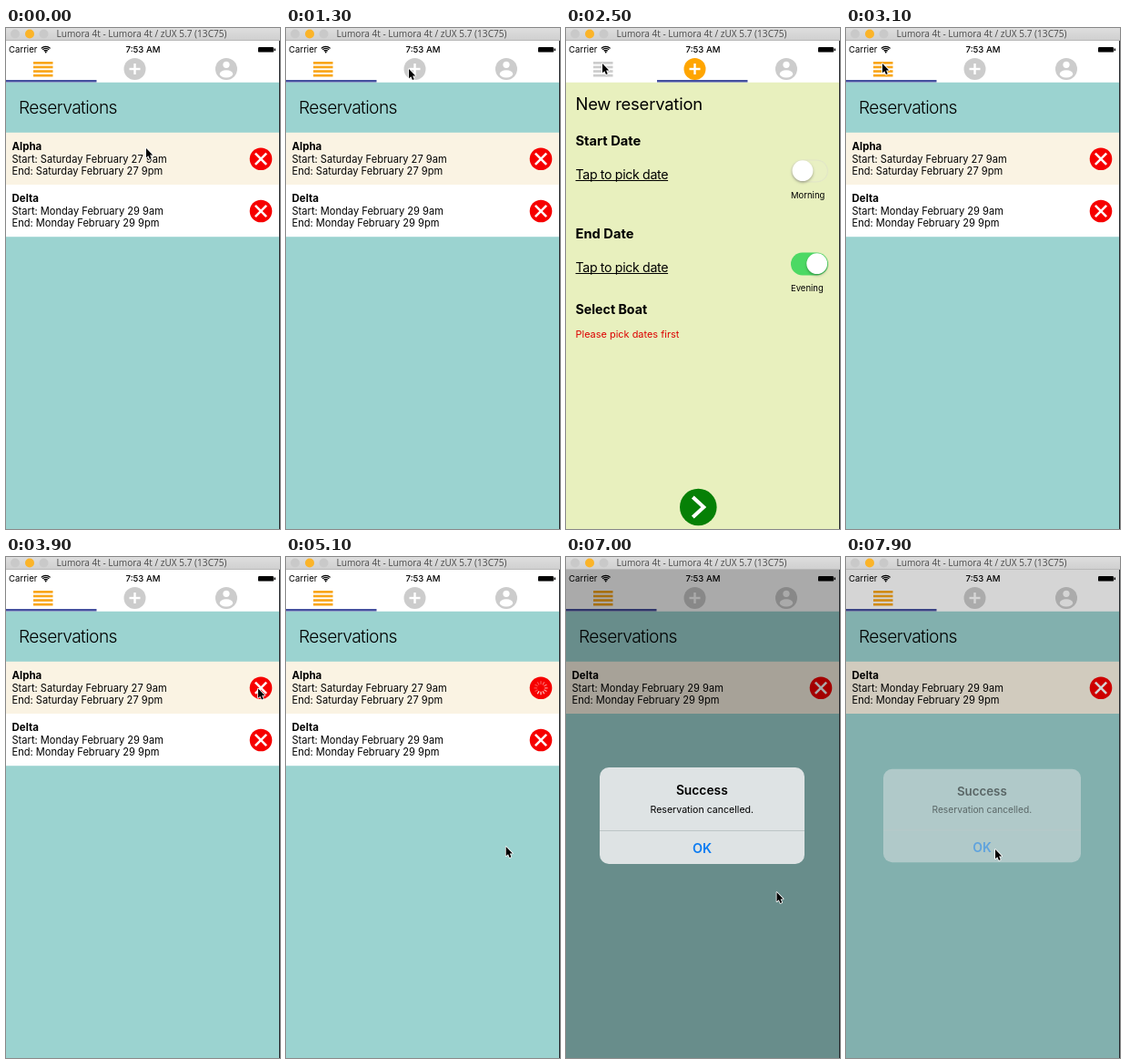
These frames come from a looping animation (301 px wide and 550 px high, 8 s). An HTML page with a canvas:

```html
<!DOCTYPE html>
<html lang="en">
<head>
<meta charset="utf-8">
<title>Reservations</title>
<style>
html, body { margin: 0; width: 100%; height: 100%; overflow: hidden; background: #9bd3d0; }
canvas { display: block; width: 301px; height: 550px; }
</style>
</head>
<body>
<canvas id="stage"></canvas>
<script>
const W = 301, H = 550, LOOP = 8000;
const canvas = document.getElementById('stage');
const ctx = canvas.getContext('2d');
const dpr = window.devicePixelRatio || 1;
canvas.width = Math.round(W * dpr);
canvas.height = Math.round(H * dpr);

const SANS = 'Inter, "Liberation Sans", sans-serif';
const ORANGE = '#f9a61a', GREY = '#cccccc', TEAL = '#9bd3d0', LIME = '#e8f0be';
const PAGE_TOP = 59.5, ROW_TOP = 114.8, ROW_H = 57.2;

const OPEN = [1900, 2200], BACK = [2800, 3100];
const CANCEL = 4500, DONE = 6600, DISMISS = 7800;

// Pointer stops: time, x, y
const POINTER = [
  [0, 154, 132], [600, 154, 132], [1250, 135, 45], [2150, 135, 45],
  [2480, 40, 39], [3100, 40, 39], [3800, 277, 144.5], [4650, 277, 144.5],
  [5300, 231.5, 368], [7200, 231.5, 368], [7700, 164, 321], [LOOP, 164, 321]
];

const clamp = v => Math.max(0, Math.min(1, v));
const smooth = v => v * v * (3 - 2 * v);
const span = (t, a, b) => clamp((t - a) / (b - a));
const mix = (a, b, k) => a + (b - a) * k;

function rect(x, y, w, h, color) {
  ctx.fillStyle = color;
  ctx.fillRect(x, y, w, h);
}

function round(x, y, w, h, r, color) {
  ctx.fillStyle = color;
  ctx.beginPath();
  ctx.roundRect(x, y, w, h, r);
  ctx.fill();
}

function disc(x, y, r, color) {
  ctx.fillStyle = color;
  ctx.beginPath();
  ctx.arc(x, y, r, 0, Math.PI * 2);
  ctx.fill();
}

function stroke(points, width, color) {
  ctx.strokeStyle = color;
  ctx.lineWidth = width;
  ctx.beginPath();
  points.forEach(([x, y], i) => i ? ctx.lineTo(x, y) : ctx.moveTo(x, y));
  ctx.stroke();
}

function text(str, x, y, size, opt = {}) {
  const { weight = 400, color = '#000', align = 'left', family = SANS, track = 0 } = opt;
  ctx.font = `${weight} ${size}px ${family}`;
  ctx.letterSpacing = track + 'px';
  ctx.textAlign = align;
  ctx.fillStyle = color;
  ctx.fillText(str, x, y);
  return ctx.measureText(str).width;
}

function titleBar() {
  const g = ctx.createLinearGradient(0, 0, 0, 14);
  g.addColorStop(0, '#dedede');
  g.addColorStop(1, '#cfcfcf');
  rect(0, 0, W, 14, g);
  rect(0, 13, W, 1, '#b8b8b8');
  disc(10, 6.5, 5, '#c9c9c9');
  disc(26, 6.5, 5, '#fbb429');
  disc(41.5, 6.5, 5, '#c9c9c9');
  text('Lumora 4t - Lumora 4t / zUX 5.7 (13C75)', 149, 10, 10.1,
    { color: '#4a4a4a', align: 'center', family: '"Open Sans", "Noto Sans", sans-serif' });
}

function statusBar() {
  rect(0, 14, W, 46, '#fff');
  text('Carrier', 3, 27, 9.6);
  text('7:53 AM', 150.5, 27, 9.6, { weight: 500, align: 'center' });
  for (const r of [2.8, 5, 7]) {
    ctx.strokeStyle = '#000';
    ctx.lineWidth = 1.3;
    ctx.beginPath();
    ctx.arc(43.7, 27.3, r, -Math.PI * 0.75, -Math.PI * 0.25);
    ctx.stroke();
  }
  disc(43.7, 26.5, 0.9, '#000');
  round(277, 21, 17, 5.6, 1.2, '#000');
  rect(294.6, 22.5, 1.4, 2.6, '#000');
}

function tabs(pos) {
  const onNew = pos > 0.5;
  for (let i = 0; i < 4; i++) rect(30, 37 + i * 4.6, 21.5, 2.7, onNew ? GREY : ORANGE);

  disc(141.5, 45, 12, onNew ? '#ffa500' : GREY);
  stroke([[135.5, 45], [147.5, 45]], 2.4, '#fff');
  stroke([[141.5, 39], [141.5, 51]], 2.4, '#fff');

  disc(242, 45, 12, GREY);
  disc(242, 40.3, 3.6, '#fff');
  ctx.beginPath();
  ctx.ellipse(242, 50.4, 7.2, 4.2, 0, 0, Math.PI * 2);
  ctx.fill();

  rect(pos * 100, 57, 99.5, PAGE_TOP - 57, '#45509f');
}

function spinner(x, y, t) {
  const head = Math.floor(t / 83) % 12;
  for (let i = 0; i < 12; i++) {
    const a = i * Math.PI / 6;
    const age = (head - i + 12) % 12;
    ctx.globalAlpha = Math.max(0.3, 0.9 - age * 0.08);
    const c = Math.sin(a), s = -Math.cos(a);
    stroke([[x + c * 4, y + s * 4], [x + c * 7.5, y + s * 7.5]], 1.2, '#fff');
  }
  ctx.globalAlpha = 1;
}

function row(y, color, name, day, busy, t) {
  rect(0, y, 300, ROW_H, color);
  text(name, 6.5, y + 19, 11.5, { weight: 700 });
  text(`Start: ${day} 9am`, 6.5, y + 32.7, 11.1);
  text(`End: ${day} 9pm`, 6.5, y + 46.2, 11.1);
  const cx = 280, cy = y + 29, d = 6.1;
  disc(cx, cy, 12.3, '#f60000');
  if (busy) {
    spinner(cx, cy, t);
  } else {
    stroke([[cx - d, cy - d], [cx + d, cy + d]], 2.5, '#fff');
    stroke([[cx + d, cy - d], [cx - d, cy + d]], 2.5, '#fff');
  }
}

function listPage(t) {
  rect(0, PAGE_TOP, W, H - PAGE_TOP, TEAL);
  text('Reservations', 14, 94, 19.2, { weight: 300, track: -0.6 });
  const rows = [['Alpha', 'Saturday February 27'], ['Delta', 'Monday February 29']];
  const busy = t >= CANCEL && t < DONE;
  if (t >= DONE) rows.shift();
  rows.forEach(([name, day], i) =>
    row(ROW_TOP + i * ROW_H, i ? '#fff' : '#faf3e3', name, day, busy && i === 0, t - CANCEL));
}

function toggle(y, on) {
  round(247, y - 12.5, 41, 25, 12.5, on ? '#4cd964' : '#e2e6c6');
  if (!on) round(248.2, y - 11.3, 38.6, 22.6, 11.3, '#e9f0c3');
  ctx.save();
  ctx.shadowColor = 'rgba(0,0,0,.3)';
  ctx.shadowBlur = 3 * dpr;
  ctx.shadowOffsetY = 1.6 * dpr;
  disc(on ? 275.7 : 260, y - 0.3, 11.4, '#fff');
  ctx.restore();
}

function dateField(y, label, on, caption) {
  text(label, 10.5, y, 14.7, { weight: 700 });
  const w = text('Tap to pick date', 10.5, y + 37, 14.2, { track: -0.35 });
  rect(10.5, y + 38, w, 1, '#000');
  toggle(y + 28, on);
  text(caption, 247, y + 58, 9.5);
}

function newPage() {
  rect(0, PAGE_TOP, W, H - PAGE_TOP, LIME);
  text('New reservation', 10.5, 90, 18.4, { track: -0.2 });
  dateField(129, 'Start Date', false, 'Morning');
  dateField(231, 'End Date', true, 'Evening');
  text('Select Boat', 10.5, 313.5, 14.2, { weight: 700 });
  text('Please pick dates first', 10.5, 340, 10.95, { color: '#dc0000' });
  disc(145.3, 526, 20.3, '#068006');
  stroke([[139.3, 515], [151.3, 526], [139.3, 537]], 4, '#fff');
}

function pages(pos, t) {
  ctx.save();
  ctx.beginPath();
  ctx.rect(0, PAGE_TOP, W, H - PAGE_TOP);
  ctx.clip();
  if (pos < 1) {
    ctx.save();
    ctx.translate(-pos * W, 0);
    listPage(t);
    ctx.restore();
  }
  if (pos > 0) {
    ctx.translate((1 - pos) * W, 0);
    newPage();
  }
  ctx.restore();
}

function alertBox(t) {
  const enter = smooth(span(t, DONE, DONE + 300));
  const leave = span(t, DISMISS, DISMISS + 200);
  const show = enter * (1 - leave);
  if (show <= 0) return;
  rect(0, 14, W, H - 14, `rgba(0,0,0,${0.335 * show})`);
  const scale = mix(1.18, 1, enter) - 0.07 * leave;
  ctx.save();
  ctx.globalAlpha = show;
  ctx.translate(149.5, 284);
  ctx.scale(scale, scale);
  ctx.translate(-149.5, -284);
  round(37, 231, 225, 106, 10, '#dee3e4');
  rect(37, 300, 225, 1, '#bcc5c6');
  text('Success', 149.3, 261, 13.8, { weight: 600, align: 'center' });
  text('Reservation cancelled.', 149.3, 281, 10.6, { align: 'center' });
  text('OK', 149.5, 325, 14.4, { weight: 600, align: 'center', color: '#0c7cf2' });
  ctx.restore();
}

function pointer(t) {
  const i = POINTER.findIndex(p => p[0] > t);
  const [t0, x0, y0] = POINTER[i - 1], [t1, x1, y1] = POINTER[i];
  const k = smooth(span(t, t0, t1));
  const shape = [[0, 0], [0, 12], [2.7, 9.5], [4.6, 14], [6.7, 13.1], [4.8, 8.8], [8.4, 8.6]];
  ctx.save();
  ctx.translate(mix(x0, x1, k), mix(y0, y1, k));
  ctx.scale(0.86, 0.86);
  ctx.beginPath();
  shape.forEach(([x, y]) => ctx.lineTo(x, y));
  ctx.closePath();
  ctx.lineJoin = 'round';
  ctx.lineWidth = 1.8;
  ctx.strokeStyle = '#fff';
  ctx.stroke();
  ctx.fillStyle = '#000';
  ctx.fill();
  ctx.restore();
}

function draw(t) {
  ctx.setTransform(dpr, 0, 0, dpr, 0, 0);
  const pos = smooth(span(t, ...OPEN)) - smooth(span(t, ...BACK));
  statusBar();
  pages(pos, t);
  tabs(pos);
  alertBox(t);
  titleBar();
  rect(300, 14, 1, H - 14, '#25282c');
  pointer(t);
}

const start = performance.now();
function tick() {
  draw((performance.now() - start) % LOOP);
  requestAnimationFrame(tick);
}
tick();
</script>
</body>
</html>
```
